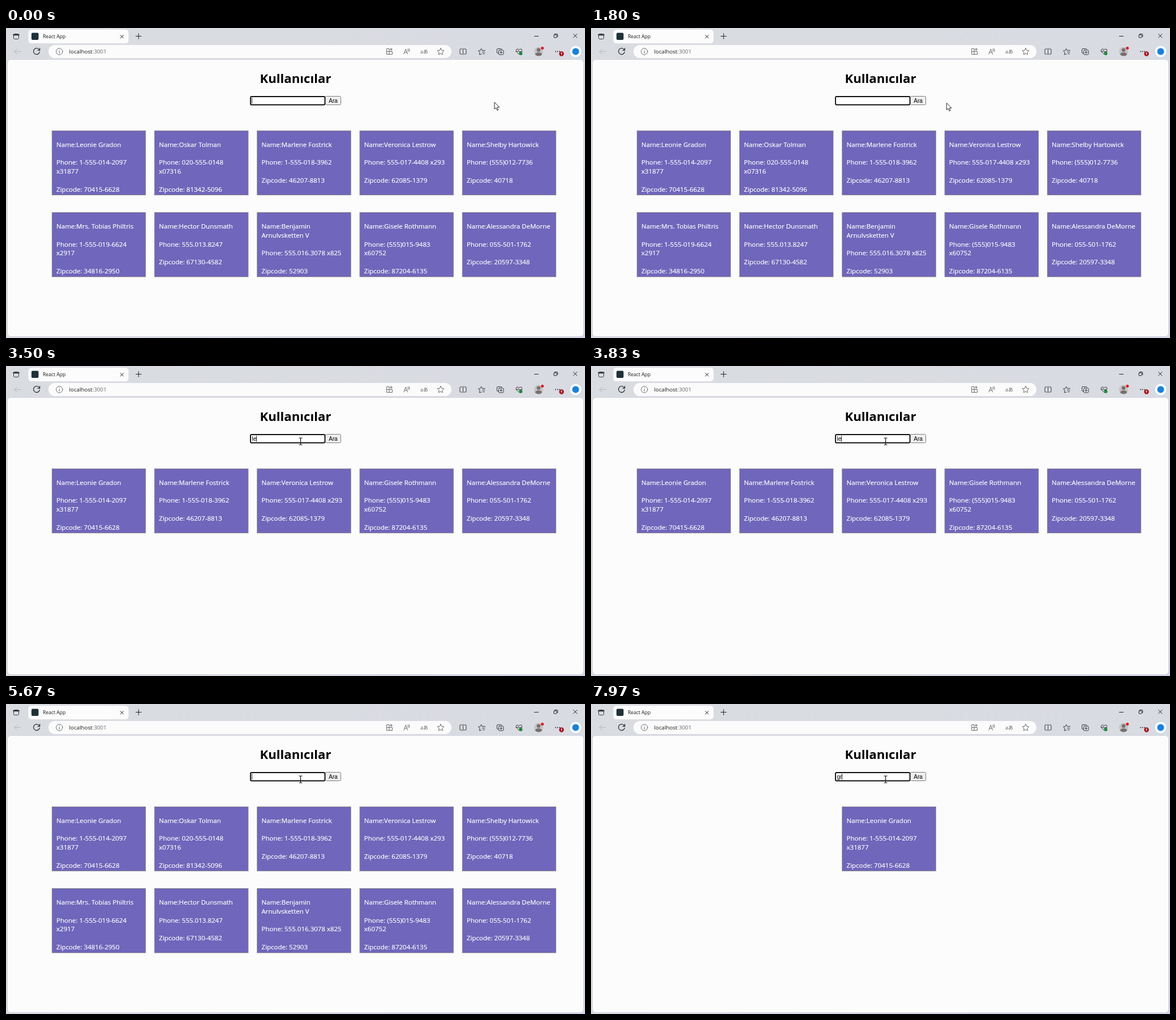
These frames come from a looping animation (1023 px wide and 547 px high, 8 s). An HTML page:

```html
<!DOCTYPE html>
<html lang="tr">
<head>
<meta charset="utf-8">
<title>Kullanıcılar</title>
<style>
html, body { margin: 0; width: 100%; height: 100%; overflow: hidden; background: #d9dbe2; }
svg { display: block; }
text { font-family: "Open Sans", "Noto Sans", sans-serif; white-space: pre; }
.ctl text { font: 10px "Liberation Sans", Arial, sans-serif; }
.ico { fill: none; stroke: #3a3a3d; stroke-width: 1; stroke-linecap: round; stroke-linejoin: round; }
.soft { stroke: #6b6b70; }
.card rect { fill: #7066bb; stroke: #7c7c7c; stroke-width: .8; }
.card text { fill: #fff; stroke: #fff; stroke-width: .2; font-size: 11.5px; }
</style>
</head>
<body>
<svg id="stage" width="1023" height="547" viewBox="0 0 1023 547">
  <defs>
    <linearGradient id="frame" x2="1" y2="1">
      <stop offset="0" stop-color="#d9dce0"/>
      <stop offset=".6" stop-color="#d9dbe2"/>
      <stop offset="1" stop-color="#d3d6ea"/>
    </linearGradient>
  </defs>
  <rect width="1023" height="547" fill="url(#frame)"/>

  <!-- tab strip -->
  <rect x="39.500" y="3" width="177" height="24" rx="5.500" fill="#fcfcfd"/>
  <rect x="45" y="8.500" width="12.500" height="12.500" rx="2" fill="#1f3038"/>
  <text x="65" y="18.200" font-size="8.650" fill="#1b1b1b">React App</text>
  <g class="ico">
    <rect x="13.500" y="10.500" width="9" height="9" rx="2"/>
    <path d="M13.500 12h9" stroke-width="2.600"/>
    <path d="M202 12.500l5.500 5.500m0-5.500l-5.500 5.500" stroke="#222"/>
    <path d="M229.500 14.500h9.500m-4.750-4.750v9.500" stroke="#222"/>
    <path d="M933.500 14.500h7" stroke="#222"/>
    <rect x="968" y="12" width="5" height="5" rx="1" stroke="#222"/>
    <path d="M969.700 10.500h3.500q1.500 0 1.500 1.500v3.500" stroke="#222"/>
    <path d="M1002.500 10.500l6.500 6.500m0-6.500l-6.500 6.500" stroke="#222"/>
  </g>

  <!-- toolbar -->
  <rect x="75" y="30" width="712" height="23" rx="11.500" fill="#fbfbfc"/>
  <g class="ico">
    <path d="M26 41.500h-11m4.500-4.500l-4.500 4.500l4.500 4.500" stroke="#b5b7bc"/>
    <path d="M59.200 39a5.500 5.500 0 1 0 .3 3.200M59.700 35.700v3.600h-3.600" stroke="#2b2b2e" stroke-width="1.200"/>
    <g class="soft">
      <circle cx="94.300" cy="41.500" r="5.700"/>
      <path d="M94.300 41v3.300M94.300 38.600v.2" stroke-width="1.100"/>
      <path d="M673 36.500h4v10h-4zM673 41.500h9.500v5h-9.500M680.500 35.500v4.500m-2.250-2.250h4.500"/>
      <path d="M703 46l3.300-9l3.300 9m-5.400-3h4.200M709.800 37q1.500 1.700.6 4M711.800 36q2.200 2.700.8 5.700"/>
      <path d="M768 35.600l1.800 3.700l4.100.6l-3 2.900l.7 4.100l-3.600-1.900l-3.600 1.900l.7-4.100l-3-2.900l4.100-.6z"/>
    </g>
    <path d="M807.500 36v11M805.500 37h-2.500q-1 0-1 1v7q0 1 1 1h2.500M809.500 37h2.500q1 0 1 1v7q0 1-1 1h-2.500"/>
    <path d="M840 46l-3.500 1l.6-4.200l-2.600-2.600l3.500-.5l1.700-3.400l1.700 3.400M842 39.500h4.500M841.500 42.500h4.500M842.500 45.500h3"/>
    <path d="M870 44.500h-1q-1.500 0-1.500-1.500v-5q0-1.500 1.500-1.500h5.500q1.500 0 1.500 1.500"/>
    <rect x="870.500" y="39" width="8.500" height="8" rx="1.500"/>
    <path d="M874.750 41v4m-2-2h4"/>
    <path d="M906.500 46.500l-4.600-4.700q-1.500-2 0-4q2.200-2 4.600.6q2.400-2.600 4.600-.6q1.500 2 0 4zM901 41.500h3l1.300-1.800l1.700 3.200l1-1.400h2.500"/>
  </g>
  <text x="732" y="45" font-size="9" fill="#606065">aあ</text>
  <circle cx="909.500" cy="45" r="3" fill="#1f8a3b"/>
  <circle cx="941" cy="41.500" r="8" fill="#c6c4c4"/>
  <circle cx="941" cy="38.700" r="3.300" fill="#77706f"/>
  <path d="M934.800 46.600q1.200-3.600 6.200-3.600t6.200 3.600q-2.200 2.900-6.200 2.900t-6.200-2.900z" fill="#77706f"/>
  <circle cx="947.700" cy="35.500" r="2.500" fill="#e3121f"/>
  <g fill="#2b2b2e"><circle cx="971" cy="41.500" r=".9"/><circle cx="974.500" cy="41.500" r=".9"/><circle cx="978" cy="41.500" r=".9"/></g>
  <circle cx="981.500" cy="45.500" r="4.200" fill="#a80d1c"/>
  <path d="M981.500 47.700v-4.200m-1.500 1.500l1.500-1.500l1.500 1.500" fill="none" stroke="#fff" stroke-width=".8"/>
  <circle cx="1006.500" cy="41.500" r="11" fill="#f5f9fd" stroke="#a9c8ea" stroke-width=".8"/>
  <circle cx="1006.500" cy="41.500" r="6" fill="#1c80d8"/>
  <text x="111.500" y="45" font-size="9.800" fill="#1b1b1b">localhost<tspan fill="#6b6b70">:3001</tspan></text>

  <!-- page -->
  <rect x="2.500" y="55.500" width="1018" height="489" rx="6" fill="#fcfcfc" stroke="#cfd1dd"/>
  <text x="511.500" y="97.400" font-size="22.200" font-weight="700" text-anchor="middle">Kullanıcılar</text>
  <g class="ctl">
    <rect x="432" y="121" width="131.500" height="14.500" rx="2" fill="#fff" stroke="#101010" stroke-width="1.900"/>
    <rect x="564.500" y="120.500" width="27" height="15" rx="2" fill="#efefef" stroke="#7b7b7b"/>
    <text x="578" y="131.600" text-anchor="middle">Ara</text>
    <text id="query" x="434.500" y="131.600"></text>
    <rect id="caret" y="123" width="1" height="10.500" fill="#222"/>
  </g>
  <g id="cards"></g>
  <path id="arrow" d="M0 0v12.200l2.800-2.600l2 4.600l2-.9l-2-4.400h3.900z" fill="#fff" stroke="#111" stroke-width=".9" stroke-linejoin="round"/>
  <path id="beam" d="M-3-6h2.300l.7.600l.7-.6h2.300M0-5.400v11M-3 6h2.300l.7-.6l.7.600h2.300" fill="none" stroke="#111" stroke-width="1.200"/>
</svg>
<script>
const LOOP = 8000, BLINK = 530;
const CARD = { w: 166.2, h: 114.2, stepX: 181.25, stepY: 144.3, top: 180.9, midX: 526.5 };
const NS = "http://www.w3.org/2000/svg";
const $ = id => document.getElementById(id);

// name, phone, zipcode; "|" breaks the line
const users = [
  ["Leonie Gradon", "1-555-014-2097|x31877", "70415-6628"],
  ["Oskar Tolman", "020-555-0148|x07316", "81342-5096"],
  ["Marlene Fostrick", "1-555-018-3962", "46207-8813"],
  ["Veronica Lestrow", "555-017-4408 x293", "62085-1379"],
  ["Shelby Hartowick", "(555)012-7736", "40718"],
  ["Mrs. Tobias Philtris", "1-555-019-6624|x2917", "34816-2950"],
  ["Hector Dunsmath", "555.013.8247", "67130-4582"],
  ["Benjamin|Arnulvsketten V", "555.016.3078 x825", "52903"],
  ["Gisele Rothmann", "(555)015-9483|x60752", "87204-6135"],
  ["Alessandra DeMorne", "055-501-1762", "20597-3348"]
];

// what the search field holds from each time on; the caret restarts with each key
const keys = [[-100, ""], [3000, "l"], [3316, "le"], [4870, "l"], [5200, ""], [6000, "g"], [6450, "gr"]];
const move = { from: 1300, to: 2100, x0: 863, y0: 131, x1: 520.5, y1: 133 };

function add(parent, tag, attrs, text) {
  const el = document.createElementNS(NS, tag);
  for (const k in attrs) el.setAttribute(k, attrs[k]);
  if (text) el.textContent = text;
  parent.appendChild(el);
  return el;
}

function drawCard([name, phone, zip], x, y) {
  const g = add($("cards"), "g", { class: "card" });
  add(g, "rect", { x: x + .4, y: y + .4, width: CARD.w - .8, height: CARD.h - .8 });
  let base = y + 28.7;
  for (const part of ["Name:" + name, "Phone: " + phone, "Zipcode: " + zip]) {
    for (const line of part.split("|")) {
      add(g, "text", { x: x + 8.2, y: base }, line);
      base += 15.8;
    }
    base += 15.8;
  }
}

function drawCards(query) {
  $("cards").replaceChildren();
  const hits = users.filter(u => u[0].toLowerCase().includes(query));
  for (let i = 0; i < hits.length; i += 5) {
    const row = hits.slice(i, i + 5);
    const left = CARD.midX - ((row.length - 1) * CARD.stepX + CARD.w) / 2;
    row.forEach((u, c) => drawCard(u, left + c * CARD.stepX, CARD.top + i / 5 * CARD.stepY));
  }
}

function drawMouse(t) {
  const p = Math.min(1, Math.max(0, (t - move.from) / (move.to - move.from)));
  const e = p * p * (3 - 2 * p);
  const x = move.x0 + (move.x1 - move.x0) * e;
  const y = move.y0 + (move.y1 - move.y0) * e;
  const inField = x < 564;
  $("arrow").style.display = inField ? "none" : "";
  $("beam").style.display = inField ? "" : "none";
  $(inField ? "beam" : "arrow").setAttribute("transform", `translate(${x} ${y})`);
}

let shown = null;

function render(t) {
  const [since, query] = keys.filter(k => k[0] <= t).pop();
  if (query !== shown) {
    shown = query;
    $("query").textContent = query;
    const width = query ? $("query").getComputedTextLength() : 0;
    $("caret").setAttribute("x", Math.round(434 + width));
    drawCards(query);
  }
  $("caret").style.display = Math.floor((t - since) / BLINK) % 2 ? "none" : "";
  drawMouse(t);
}

function tick() {
  render(performance.now() % LOOP);
  requestAnimationFrame(tick);
}
tick();
</script>
</body>
</html>
```
